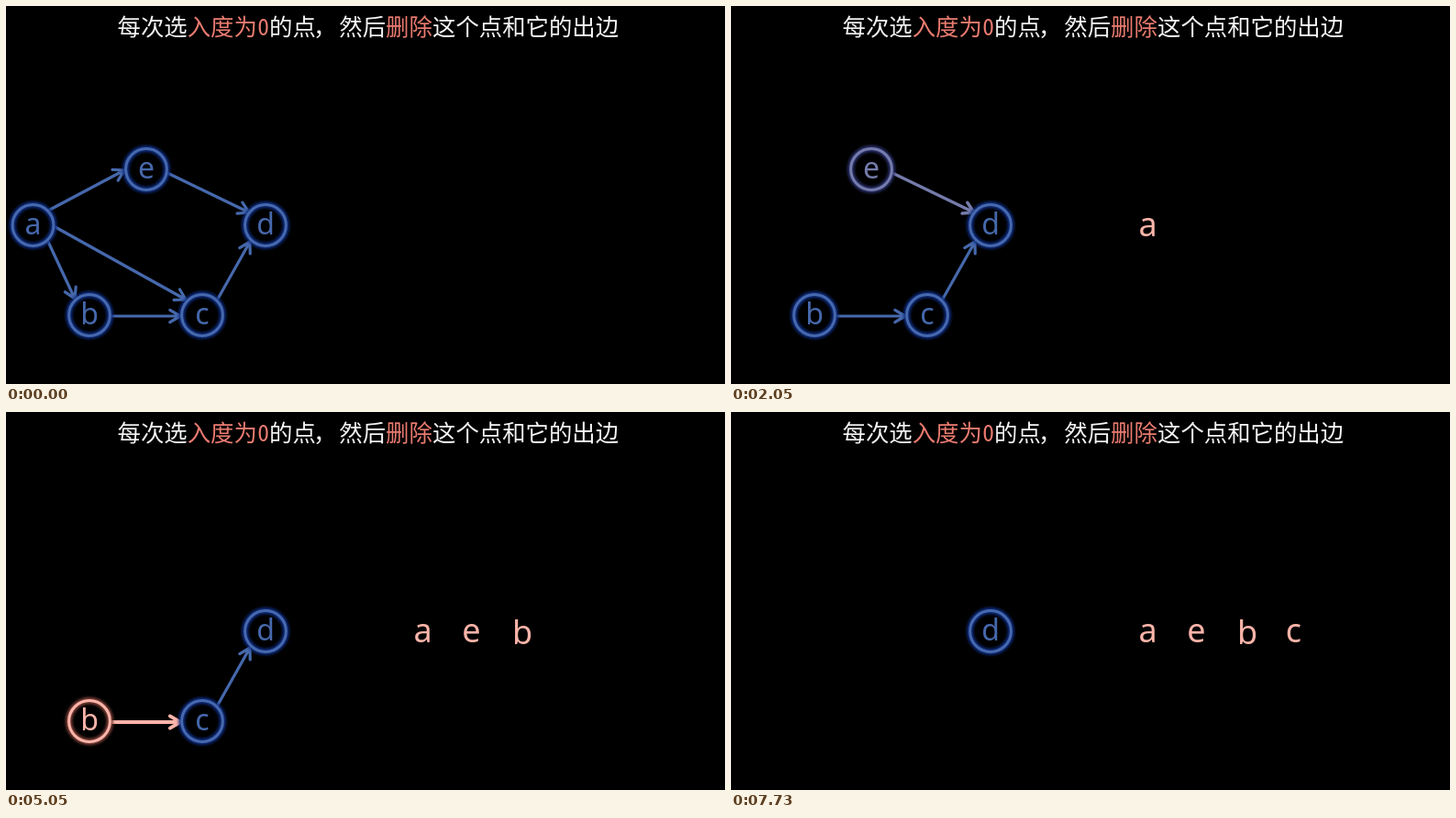
Animation, 784 px wide and 412 px high, one loop 8 s. Source, as an HTML page with a canvas:

```html
<!DOCTYPE html>
<html lang="zh-CN">
<head>
<meta charset="utf-8">
<title>拓扑排序</title>
<style>
  html, body { margin: 0; width: 100%; height: 100%; overflow: hidden; background: #000; }
  canvas { display: block; }
</style>
</head>
<body>
<canvas id="stage" width="784" height="412"></canvas>
<script>
const ctx = document.getElementById('stage').getContext('2d');
const LOOP = 8000;
const BLUE = [70, 104, 172], PINK = [252, 180, 169];
const BLUE_GLOW = [14, 44, 128], PINK_GLOW = [128, 66, 58];
const WHITE = '#f4f4f4', RED = '#ea7b70';
const TITLE_FONT = '25.4px "Noto Sans CJK SC", "Noto Sans CJK", sans-serif';
const DIGIT_FONT = '25.4px "Noto Sans Mono CJK SC", "Noto Sans CJK SC", sans-serif';
const LETTER_FONT = '"Noto Sans", "Open Sans", sans-serif';

// lit, shown and gone are [start, end] times in ms; out is the place in the result
const nodes = {
  a: { x: 29.5, y: 239, lit: [20, 480], shown: [360, 830], gone: [1370, 1640], out: [454.5, 251] },
  e: { x: 153, y: 178, lit: [1930, 2400], shown: [2250, 2720], gone: [3540, 3810], out: [507.5, 251] },
  b: { x: 91, y: 337, lit: [4160, 4600], shown: [4400, 4850], gone: [5400, 5830], out: [563, 252.5] },
  c: { x: 214, y: 337, lit: [6450, 6860], shown: [6620, 7100], gone: [6930, 7330], out: [613.5, 251] },
  d: { x: 283, y: 239 }
};

const edges = [
  ['a', 46, 223, 129, 179],
  ['a', 52, 240, 196, 320],
  ['a', 46, 257, 75, 319],
  ['e', 176, 182, 265, 225],
  ['b', 114, 338, 190, 338],
  ['c', 230.5, 320, 266, 257]
];

const title = [
  ['每次选', 121.5, WHITE], ['入度为', 197.7, RED], ['的点', 287, WHITE], ['，', 335, WHITE],
  ['然后', 363.3, WHITE], ['删除', 414, RED], ['这个点和它的出边', 465, WHITE]
];

const progress = (t, span) =>
  span ? Math.min(1, Math.max(0, (t - span[0]) / (span[1] - span[0]))) : 0;

const mix = (from, to, p) =>
  `rgb(${from.map((v, i) => Math.round(v + (to[i] - v) * p)).join()})`;

function text(str, x, y, font, color, align = 'center') {
  ctx.font = font;
  ctx.fillStyle = color;
  ctx.textAlign = align;
  ctx.fillText(str, x, y);
}

function drawTitle() {
  for (const [str, x, color] of title) text(str, x, 32.4, TITLE_FONT, color, 'left');
  text('0', 280.5, 32.4, DIGIT_FONT, RED);
}

function drawArrow(x1, y1, x2, y2) {
  const angle = Math.atan2(y2 - y1, x2 - x1);
  ctx.beginPath();
  ctx.moveTo(x1, y1);
  ctx.lineTo(x2, y2);
  for (const side of [-1, 1]) {
    const leg = angle + side * 0.53;
    ctx.moveTo(x2, y2);
    ctx.lineTo(x2 - 13 * Math.cos(leg), y2 - 13 * Math.sin(leg));
  }
  ctx.stroke();
}

function drawRing(x, y, width, color) {
  ctx.strokeStyle = color;
  ctx.lineWidth = width;
  ctx.beginPath();
  ctx.arc(x, y, 22.4, 0, 2 * Math.PI);
  ctx.stroke();
}

function drawNode(name, { x, y }, color, glow) {
  ctx.filter = 'blur(1.6px)';
  drawRing(x, y, 7, glow);
  ctx.filter = 'none';
  drawRing(x, y, 3, color);
  text(name, x, y + 10, '32px ' + LETTER_FONT, color);
}

function draw(t) {
  ctx.globalAlpha = 1;
  ctx.fillStyle = '#000';
  ctx.fillRect(0, 0, 784, 412);
  drawTitle();

  ctx.lineCap = ctx.lineJoin = 'round';
  for (const [owner, ...line] of edges) {
    const node = nodes[owner], lit = progress(t, node.lit);
    ctx.globalAlpha = 1 - progress(t, node.gone);
    ctx.strokeStyle = mix(BLUE, PINK, lit);
    ctx.lineWidth = 3.2 + 0.6 * lit;
    drawArrow(...line);
  }

  for (const [name, node] of Object.entries(nodes)) {
    const lit = progress(t, node.lit);
    ctx.globalAlpha = 1 - progress(t, node.gone);
    drawNode(name, node, mix(BLUE, PINK, lit), mix(BLUE_GLOW, PINK_GLOW, lit));
    if (node.out) {
      ctx.globalAlpha = progress(t, node.shown);
      text(name, ...node.out, '36px ' + LETTER_FONT, `rgb(${PINK})`);
    }
  }
}

function tick() {
  draw(performance.now() % LOOP);
  requestAnimationFrame(tick);
}
tick();
</script>
</body>
</html>
```
